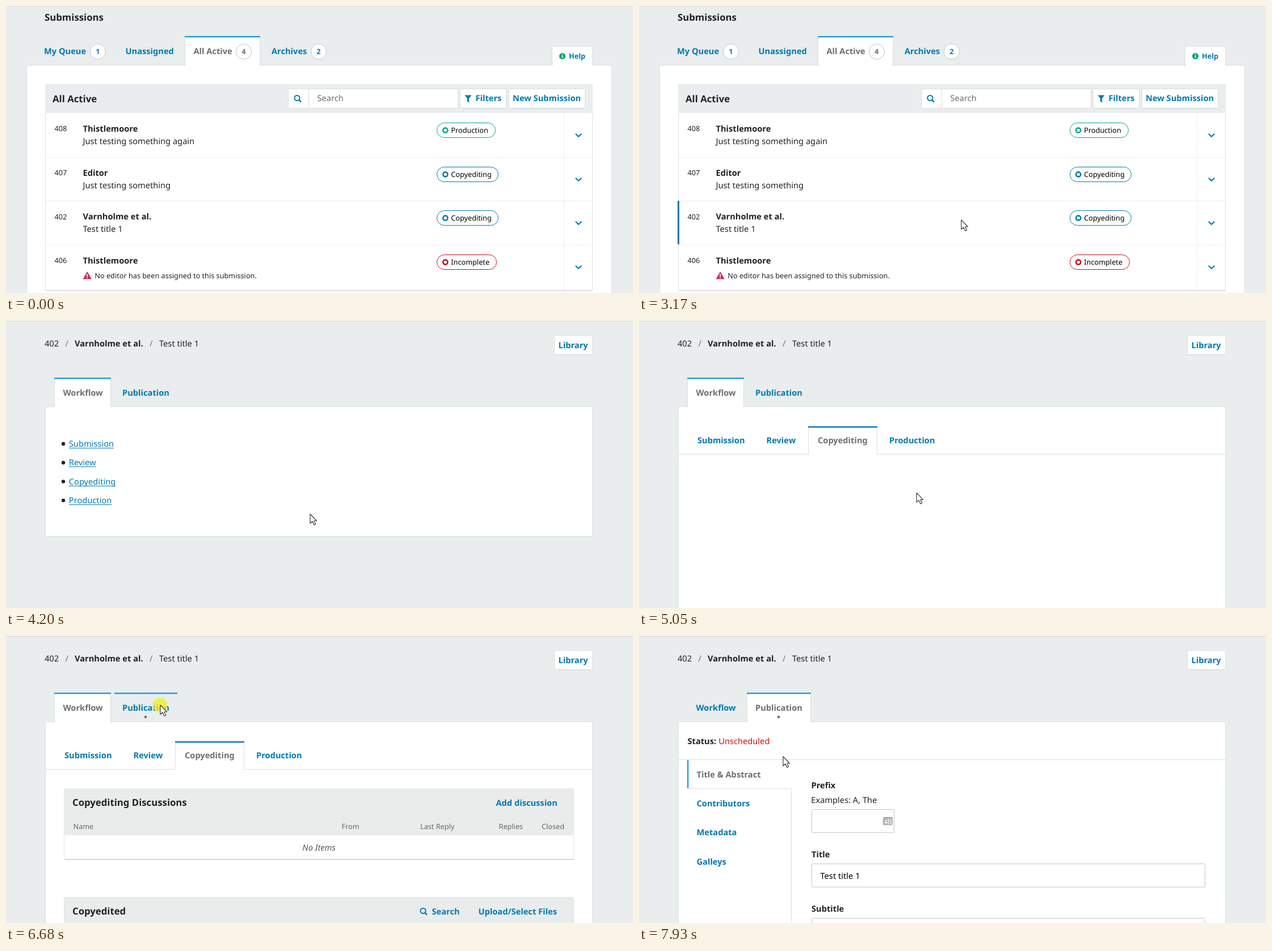
Recreate the animation shown at these times as an HTML page with a canvas. Size 1105 by 507 pixels, loop 8000 ms.

```html
<!DOCTYPE html>
<html lang="en">
<head>
<meta charset="utf-8">
<title>Submission workflow</title>
<style>
html, body { margin: 0; width: 100%; height: 100%; overflow: hidden; background: #e9edee; }
canvas { display: block; }
</style>
</head>
<body>
<canvas id="stage" width="1105" height="507"></canvas>
<script>
const ctx = document.getElementById('stage').getContext('2d');
const LOOP = 8000;
const BG = '#e9edee', BLUE = '#007ab2', SKY = '#1a9cdb', INK = '#222', GRAY = '#6f6f6f', LINE = '#dddfe0';
const BODY = 14.65, SMALL = 12.7, LARGE = 16.75;
const AUTHOR = 'Varnholme et al.', OWNER = 'Thistlemoore';
const ROW_TOP = 189, ROW_H = 77.7;

const rows = [
  { id: '408', who: OWNER, title: 'Just testing something again', stage: 'Production', color: '#00a88a', width: 103 },
  { id: '407', who: 'Editor', title: 'Just testing something', stage: 'Copyediting', color: BLUE, width: 108 },
  { id: '402', who: AUTHOR, title: 'Test title 1', stage: 'Copyediting', color: BLUE, width: 108 },
  { id: '406', who: OWNER, warning: 'No editor has been assigned to this submission.', stage: 'Incomplete', color: '#d00a14', width: 105 }
];

// Pointer legs: start time, end time, steps, end point
const START = [962, 519];
const legs = [
  [500, 1280, 11, 564, 377],
  [1370, 1370, 1, 559, 371],
  [1680, 2240, 8, 568, 378],
  [3250, 3800, 8, 558, 368],
  [3870, 3870, 1, 556, 367],
  [4040, 4200, 3, 536, 341],
  [4280, 4440, 3, 510, 312],
  [5050, 5450, 6, 385, 262],
  [5530, 5840, 5, 312, 168],
  [5920, 6450, 8, 272, 122],
  [7540, 7930, 6, 254, 213]
];

function pointerAt(t) {
  let [x, y] = START;
  for (const [from, to, steps, tx, ty] of legs) {
    if (t < from) break;
    let p = 1;
    if (t < to) p = (Math.floor((t - from) / (to - from) * (steps - 1) + 1e-6) + 1) / steps;
    if (from === 500) p = 1 - (1 - p) ** 1.5;
    x += (tx - x) * p;
    y += (ty - y) * p;
  }
  return { x, y };
}

const within = (t, a, b) => t >= a && t < b;

function rect(x, y, w, h, color) {
  ctx.fillStyle = color;
  ctx.fillRect(x, y, w, h);
}

function box(x, y, w, h, fill = '#fff', edge = LINE, r = 0) {
  ctx.beginPath();
  ctx.roundRect(x + 0.5, y + 0.5, w - 1, h - 1, r);
  ctx.fillStyle = fill;
  ctx.fill();
  ctx.strokeStyle = edge;
  ctx.lineWidth = 1;
  ctx.stroke();
}

function text(str, x, y, { size = BODY, color = INK, style = '', align = 'left' } = {}) {
  ctx.font = `${style} ${size}px "Noto Sans", sans-serif`;
  ctx.fillStyle = color;
  ctx.textAlign = align;
  ctx.fillText(str, x, y);
}

const bold = (str, x, y, color = INK, size = BODY) => text(str, x, y, { size, color, style: 'bold' });

function disc(x, y, r, color) {
  ctx.beginPath();
  ctx.arc(x, y, r, 0, Math.PI * 2);
  ctx.fillStyle = color;
  ctx.fill();
}

function ring(x, y, r, color, width) {
  ctx.beginPath();
  ctx.arc(x, y, r, 0, Math.PI * 2);
  ctx.strokeStyle = color;
  ctx.lineWidth = width;
  ctx.stroke();
}

function poly(points, color) {
  ctx.beginPath();
  points.forEach(([x, y]) => ctx.lineTo(x, y));
  ctx.closePath();
  ctx.fillStyle = color;
  ctx.fill();
}

function stroke(points, color, width) {
  ctx.beginPath();
  points.forEach(([x, y]) => ctx.lineTo(x, y));
  ctx.strokeStyle = color;
  ctx.lineWidth = width;
  ctx.stroke();
}

function magnifier(x, y) {
  ring(x - 1, y - 1, 4.6, BLUE, 2);
  stroke([[x + 2.3, y + 2.3], [x + 6, y + 6]], BLUE, 2.5);
}

// White tab joined to the panel below it
function tab(x, y, w, h, bar) {
  rect(x, y, w, h, LINE);
  rect(x + 1, y, w - 2, h + 1, '#fff');
  rect(x, y, w, 2.4, bar);
}

function badge(x, n, color) {
  disc(x, 80.5, 14, '#fff');
  ring(x, 80.5, 13.6, '#bfc3c4', 1);
  text(n, x, 85, { size: SMALL, color, style: 'bold', align: 'center' });
}

function button(label, x, y, w, textX, textY) {
  box(x, y, w, 35, '#fff', LINE, 1);
  rect(x + 1, y + 34, w - 2, 1, '#cfd2d3');
  bold(label, textX, textY, BLUE);
}

function drawRow(row, i, hover, barWidth) {
  const y = ROW_TOP + ROW_H * i;
  if (i) rect(70, Math.round(y), 963, 1, '#eceeee');
  text(row.id, 85.5, y + 32.3, { size: SMALL });
  bold(row.who, 135.5, y + 33);
  if (row.title) text(row.title, 135.5, y + 55);
  if (row.warning) {
    const b = y + 60.5;
    poly([[143.2, b - 13.5], [150.8, b], [135.6, b]], '#cb2b52');
    rect(142.3, b - 9.2, 1.8, 4.6, '#fff');
    rect(142.3, b - 3.4, 1.8, 1.8, '#fff');
    text(row.warning, 156.3, y + 59, { size: SMALL });
  }
  const top = Math.round(y + 17);
  box(759, top, row.width + 1, 27, '#fff', row.color, 13);
  ring(774.3, top + 13.5, 4.1, row.color, 2.6);
  text(row.stage, 784.3, top + 18, { size: SMALL, color: '#000' });
  const cy = Math.round(y + 39);
  stroke([[1003.8, cy - 2.3], [1009, cy + 2.8], [1014.2, cy - 2.3]], BLUE, 2.2);
  if (hover) rect(71 - barWidth, Math.round(y), barWidth, 77, BLUE);
}

function drawList(t, pointer) {
  bold('Submissions', 68, 25.5, INK, LARGE);
  box(36, 104, 1032, 420);
  bold('My Queue', 67, 85, BLUE);
  badge(162, '1', BLUE);
  bold('Unassigned', 210.5, 85, BLUE);
  tab(315, 53, 133, 52, SKY);
  bold('All Active', 330.5, 85, GRAY);
  badge(419, '4', GRAY);
  bold('Archives', 468, 85, BLUE);
  badge(551, '2', BLUE);

  rect(962, 71, 72, 35, LINE);
  rect(963, 72, 70, 34, '#fff');
  disc(980.5, 88.5, 5.6, '#00a878');
  rect(979.7, 85, 1.8, 1.7, '#fff');
  rect(979.7, 87.6, 1.8, 4, '#fff');
  bold('Help', 992, 93, BLUE, SMALL);

  box(69, 138, 965, 365, '#fff', LINE, 2);
  rect(69, 138, 965, 51, BG);
  rect(70, 502, 963, 1.5, '#d0d3d4');
  rect(983, 189, 1, 313, '#eceeee');
  bold('All Active', 82, 169.5, INK, LARGE);
  box(497, 146, 300, 35);
  rect(533, 147, 1, 33, LINE);
  magnifier(514, 163.5);
  text('Search', 548.5, 168, { color: '#6c6c6c' });
  button('Filters', 800, 146, 82, 827.5, 168);
  poly([[808.5, 157.5], [820.5, 157.5], [816.2, 163], [816.2, 170.8], [812.8, 168], [812.8, 163]], BLUE);
  button('New Submission', 886, 146, 135, 893, 168);

  const active = Math.floor((pointer.y - ROW_TOP) / ROW_H);
  rows.forEach((row, i) => drawRow(row, i, t >= 500 && i === active, t < 1680 ? 2 : 3));
}

function drawFrame(height) {
  text('402', 68, 45);
  text('/', 104.5, 45, { color: GRAY });
  bold(AUTHOR, 121, 45);
  text('/', 253, 45, { color: GRAY });
  text('Test title 1', 270, 45);
  button('Library', 966, 25, 68, 973.5, 47.7);
  box(69, 151, 965, height);
}

function drawFiles() {
  box(102, 269, 899, 126, '#fff', '#e2e4e4', 2);
  rect(102, 269, 899, 83, '#eaecec');
  rect(103, 394, 897, 1.3, '#c4c7c8');
  bold('Copyediting Discussions', 117, 300, INK, LARGE);
  bold('Add discussion', 863.5, 300, BLUE);
  [['Name', 118.5], ['From', 591.5], ['Last Reply', 730], ['Replies', 868.5], ['Closed', 944]]
    .forEach(([label, x]) => text(label, x, 340.7, { size: SMALL, color: '#666' }));
  text('No Items', 551.5, 378.5, { color: '#555', style: 'italic', align: 'center' });
  box(102, 461, 899, 80, '#eaecec', '#e2e4e4', 2);
  bold('Copyedited', 117, 491.7, INK, LARGE);
  magnifier(736, 486.5);
  bold('Search', 750.5, 491.7, BLUE);
  bold('Upload/Select Files', 832.5, 491.7, BLUE);
}

function drawWorkflow(t, pointer) {
  const loaded = t >= 4280;
  drawFrame(loaded ? 380 : 230);
  tab(85, 100, 100, 52, SKY);
  bold('Workflow', 100.5, 131.7, GRAY);
  bold('Publication', 205, 131.7, BLUE);
  if (t >= 5530) disc(246, 143, 2.2, '#666');
  if (within(pointer.x, 191, 302) && within(pointer.y, 100, 152)) rect(191, 100, 111, 2.4, SKY);

  if (!loaded) {
    ['Submission', 'Review', 'Copyediting', 'Production'].forEach((label, i) => {
      const y = 222 + i * 33.3;
      disc(101, y - 5, 3.2, INK);
      text(label, 110.8, y, { color: BLUE });
      rect(110.8, Math.round(y + 2), ctx.measureText(label).width, 1, BLUE);
    });
    return;
  }
  rect(70, 235, 963, 1, LINE);
  tab(298, 186, 122, 50, BLUE);
  bold('Submission', 103, 216.3, BLUE);
  bold('Review', 224.5, 216.3, BLUE);
  bold('Copyediting', 315, 216.3, GRAY);
  bold('Production', 441, 216.3, BLUE);
  ctx.globalAlpha = Math.min(1, Math.max(0, (t - 5435) / 360));
  drawFiles();
  ctx.globalAlpha = 1;
}

function contactIcon() {
  const c = '#9c9c9c';
  ctx.beginPath();
  ctx.roundRect(430, 320, 17, 14, 2);
  ctx.fillStyle = c;
  ctx.fill();
  rect(431.5, 322.5, 14, 10, '#fff');
  rect(432, 323, 6.5, 9, c);
  disc(435.2, 325.6, 1.7, '#fff');
  rect(432.8, 328.3, 4.8, 2.6, '#fff');
  [323.5, 326.5, 329.5].forEach(y => rect(439.7, y, 5, 1.7, c));
}

function drawPublication(t) {
  drawFrame(380);
  bold('Workflow', 100.5, 131.7, BLUE);
  tab(190, 100, 113, 52, SKY);
  bold('Publication', 205, 131.7, GRAY);
  disc(246, 143, 2.2, '#666');
  bold('Status:', 85.5, 190.7);
  text('Unscheduled', 140.2, 190.7, { color: '#c8140a' });
  rect(70, 218, 963, 1, LINE);
  rect(85, 219, 2.3, 50, SKY);
  rect(87, 269, 182, 1, LINE);
  rect(268, 269, 1, 238, LINE);
  bold('Title & Abstract', 101.5, 249.5, GRAY);
  ['Contributors', 'Metadata', 'Galleys'].forEach((label, i) => bold(label, 101.5, 301 + i * 51.3, BLUE));

  bold('Prefix', 303.5, 269.3);
  text('Examples: A, The', 303.3, 294.7);
  box(304, 306, 146, 42, '#fff', '#c3c5c6', 2);
  if (t >= 7620) contactIcon();
  bold('Title', 304, 391.3);
  box(304, 402, 694, 42, '#fff', '#c3c5c6', 2);
  text('Test title 1', 319.5, 428.5, { color: '#000' });
  bold('Subtitle', 304, 487);
  box(304, 498, 694, 42, '#fff', '#c3c5c6', 2);
}

const arrow = new Path2D('M0 0V16.5L3.9 13L7 19.3L9.7 18L6.8 12H11.6Z');
const hand = new Path2D('M-1.8 1.3Q0 -1.3 1.8 1.3V7.6Q4 6.4 4.8 8.4Q6.7 7.4 7.4 9.4Q9.4 9 9.4 11.5'
  + 'V15.5Q9.2 18 7.8 19.5V22H-.8V20.3Q-3.8 17 -5.6 13.4Q-5.6 10.8 -3.4 12L-1.8 14Z');

function drawPointer(t, { x, y }) {
  if (t < 500) return;
  if (within(t, 1530, 1680) || within(t, 6680, 6830)) disc(x - 0.5, y, 13, 'rgba(240,236,40,.75)');
  const overLink = t < 3010;
  ctx.save();
  ctx.translate(x, y);
  ctx.fillStyle = '#fff';
  ctx.strokeStyle = '#3a3a42';
  ctx.lineWidth = 1.2;
  ctx.lineJoin = 'round';
  const shape = overLink ? hand : arrow;
  ctx.fill(shape);
  ctx.stroke(shape);
  if (overLink) {
    ctx.lineWidth = 1;
    ctx.stroke(new Path2D('M1.8 7.6V11M4.8 8.4V11.5M7.4 9.4V12'));
  }
  ctx.restore();
}

function draw(now) {
  const t = now % LOOP;
  const pointer = pointerAt(t);
  ctx.textRendering = 'geometricPrecision';
  rect(0, 0, 1105, 507, BG);
  if (t < 3410) drawList(t, pointer);
  else if (t < 6830) drawWorkflow(t, pointer);
  else drawPublication(t);
  rect(0, 0, 1105, 1, '#d2d6d7');
  drawPointer(t, pointer);
}

const begin = performance.now();
function tick() {
  draw(performance.now() - begin);
  requestAnimationFrame(tick);
}
tick();
</script>
</body>
</html>
```
